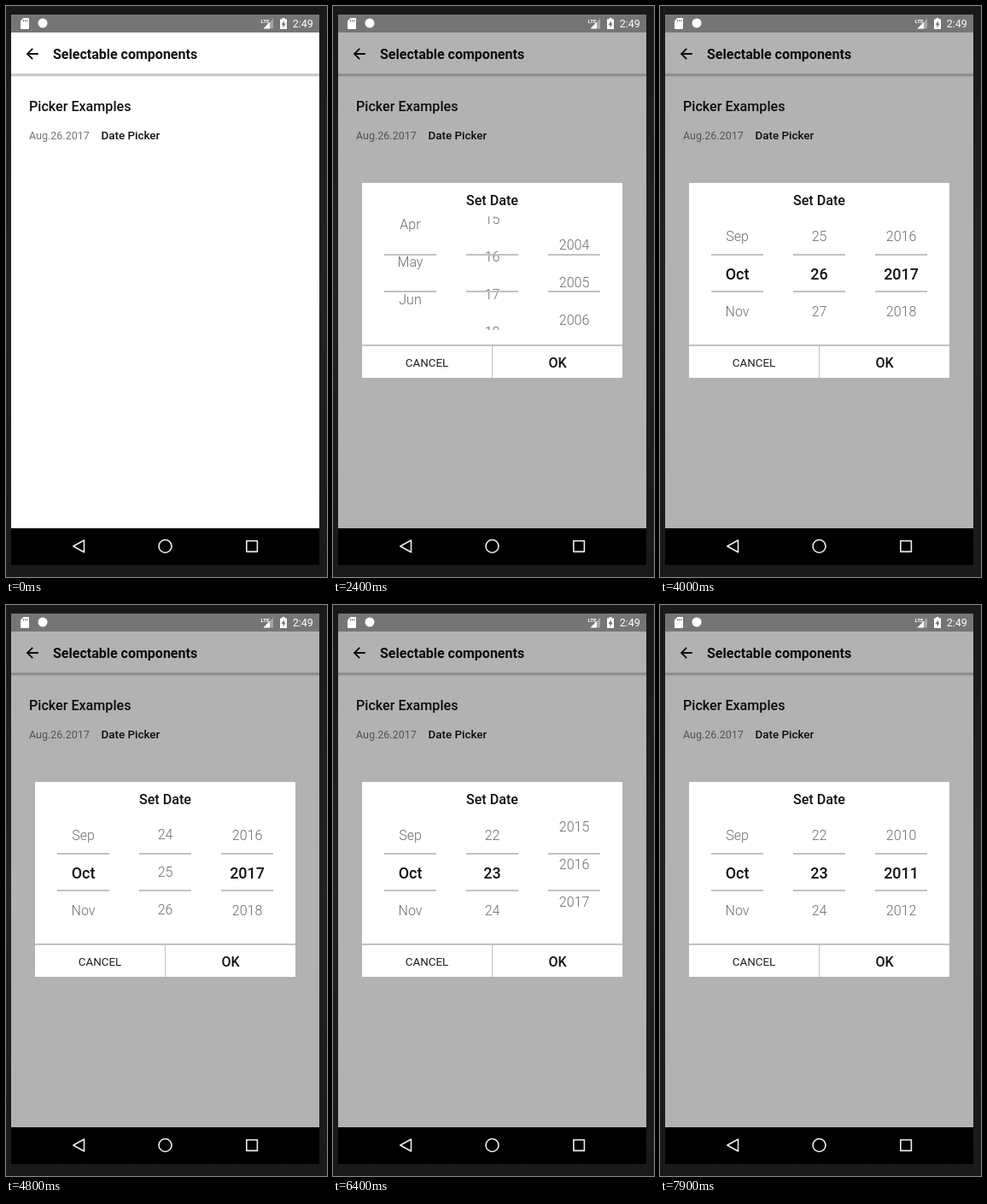
These frames come from a looping animation (376 px wide and 668 px high, 8 s). An HTML page:

```html
<!DOCTYPE html>
<html lang="en">
<head>
<meta charset="utf-8">
<title>Date picker</title>
<style>
  html, body { margin: 0; width: 100%; height: 100%; overflow: hidden; background: #1b1b1b; }
  svg { display: block; width: 376px; height: 668px; font-family: Roboto, sans-serif; }
  .medium { font-weight: 500; }
  .bold { font-weight: 700; }
  .middle, .wheel { text-anchor: middle; }
  .wheel text { font-size: 16px; font-weight: 300; fill: #6c6c6c; }
  .wheel text.selected { font-size: 17.9px; font-weight: 500; fill: #111; }
  .line { fill: none; stroke: #c2c2c2; stroke-width: 2; }
</style>
</head>
<body>
<svg viewBox="0 0 376 668">
  <defs>
    <linearGradient id="frame" x2="0" y2="1">
      <stop offset="0" stop-color="#191919"/>
      <stop offset=".5" stop-color="#222"/>
      <stop offset="1" stop-color="#191919"/>
    </linearGradient>
    <linearGradient id="shadow" x2="0" y2="1">
      <stop offset="0" stop-color="#000" stop-opacity=".34"/>
      <stop offset="1" stop-color="#000" stop-opacity="0"/>
    </linearGradient>
    <clipPath id="wheelArea"><rect x="34" y="246" width="305" height="133"/></clipPath>
  </defs>

  <rect width="376" height="668" fill="url(#frame)"/>
  <rect x="6" y="10" width="361" height="644"/>

  <!-- status bar -->
  <rect x="6" y="10" width="361" height="21" fill="#757575"/>
  <g fill="#fff">
    <path d="M20.500 14H26q1 0 1 1V26q0 1-1 1H18q-1 0-1-1V17.500Z"/>
    <path d="M20.500 16v2.500M22.700 16v2.500M24.900 16v2.500" stroke="#757575"/>
    <circle cx="43" cy="20" r="5.500"/>
    <text x="298.500" y="19.500" font-size="6.200" class="bold">LTE</text>
    <path d="M313 14.500V26.500H301.500Z" opacity=".35"/>
    <path d="M309 18.700V26.500H301.500Z"/>
    <path d="M323.500 14h3v1.500H329V27h-8V15.500h2.500Z"/>
    <path d="M326 17l-3.500 5h2v3.500l3.200-5h-2Z" fill="#757575"/>
    <text x="335.800" y="25" font-size="12.500">2:49</text>
  </g>

  <!-- page -->
  <rect x="6" y="31" width="361" height="580" fill="#fff"/>
  <rect x="6" y="79.500" width="361" height="4" fill="url(#shadow)"/>
  <path d="M37.800 56H25.500M31.200 49.800 25 56l6.200 6.200" fill="none" stroke="#111" stroke-width="1.800"/>
  <g fill="#111">
    <text x="55" y="62" font-size="16" class="bold">Selectable components</text>
    <text x="27" y="123" font-size="16.100" class="medium">Picker Examples</text>
    <text x="111.500" y="156" font-size="13.400" class="medium">Date Picker</text>
  </g>
  <text x="27" y="156" font-size="12.500" fill="#757575">Aug.26.2017</text>
  <rect id="pressed" x="27" y="142" width="71" height="17.500"/>

  <!-- dialog -->
  <g id="dialog">
    <rect x="6" y="31" width="361" height="580" opacity=".3"/>
    <rect x="34" y="207" width="305" height="228" fill="#fff"/>
    <text x="186.500" y="233" font-size="16.100" fill="#111" class="medium middle">Set Date</text>
    <g id="wheels" clip-path="url(#wheelArea)"></g>
    <path class="line" d="M60 291h61m35 0h61m35 0h61M60 334h61m35 0h61m35 0h61"/>
    <path class="line" d="M34 397H339"/>
    <path class="line" d="M186.500 397V435" style="stroke-width:1"/>
    <text x="110" y="422" font-size="13.400" fill="#222" class="middle">CANCEL</text>
    <text x="263" y="423" font-size="16" fill="#111" class="medium middle">OK</text>
  </g>

  <!-- navigation bar -->
  <g fill="none" stroke="#eee" stroke-width="1.600" stroke-linejoin="round">
    <path d="M91.500 625V639L78.800 632Z"/>
    <circle cx="186.500" cy="632" r="7.500"/>
    <rect x="281.800" y="625.800" width="12.600" height="12.600"/>
  </g>
</svg>
<script>
const LOOP = 8000, STEP = 100, PRESS = 1700, OPEN = 2400, SETTLED = 3100;
const ROW = 44, CENTER = 313.3;
const MONTHS = 'Jan Feb Mar Apr May Jun Jul Aug Sep Oct Nov Dec'.split(' ');

const linear = u => u;
const smooth = u => (1 - Math.cos(Math.PI * u)) / 2;
const speedUp = u => u ** 1.2;
const slowDown = u => 1 - (1 - u) ** 2;

// Each move: [start, end, destination, easing]
const wheels = [
  { x: 90.5, first: 1, opened: 8, label: n => MONTHS[(n + 11) % 12],
    moves: [[3300, 4000, 10, smooth]] },
  { x: 186.5, first: 1, opened: 26, label: String,
    moves: [[4500, 5300, 22.82, smooth], [5300, 5400, 22.81, linear], [5400, 5700, 23, smooth]] },
  { x: 282.5, first: 1985, opened: 2017, label: String,
    moves: [[6200, 7100, 2012.34, speedUp], [7100, 7500, 2011.38, slowDown], [7600, 7900, 2011, smooth]] }
];

const svgNode = (tag, attributes, parent) => {
  const node = document.createElementNS('http://www.w3.org/2000/svg', tag);
  for (const name in attributes) node.setAttribute(name, attributes[name]);
  return parent.appendChild(node);
};
const byId = id => document.getElementById(id);

for (const wheel of wheels) {
  const group = svgNode('g', { class: 'wheel' }, byId('wheels'));
  wheel.rows = [-2, -1, 0, 1, 2].map(() => svgNode('text', { x: wheel.x }, group));
}

function wheelValue({ first, opened, moves }, t) {
  if (t < SETTLED) {
    // tail of a viscous scroll, already under way when the dialog appears
    const remaining = 0.632 * Math.exp(1 - 1.504 - 0.0108 * (t - OPEN));
    return opened - remaining * (opened - first);
  }
  let value = opened;
  for (const [start, end, to, ease] of moves) {
    if (t <= start) break;
    value += (to - value) * ease(Math.min(1, (t - start) / (end - start)));
  }
  return value;
}

function drawWheel(wheel, t) {
  const value = wheelValue(wheel, t), nearest = Math.round(value);
  const moving = t < SETTLED || (t > wheel.moves[0][0] && t < wheel.moves.at(-1)[1]);
  wheel.rows.forEach((row, i) => {
    const item = nearest + i - 2, selected = !moving && i === 2;
    row.textContent = wheel.label(item);
    row.setAttribute('class', selected ? 'selected' : '');
    row.setAttribute('y', CENTER + (item - value) * ROW + (selected ? 6.5 : 5.7));
  });
}

function draw(now) {
  const t = Math.floor((now % LOOP) / STEP) * STEP;
  byId('pressed').style.display = t >= PRESS && t < OPEN ? '' : 'none';
  byId('dialog').style.display = t >= OPEN ? '' : 'none';
  if (t >= OPEN) wheels.forEach(wheel => drawWheel(wheel, t));
}

const began = performance.now();
function tick() {
  draw(performance.now() - began);
  requestAnimationFrame(tick);
}
tick();
</script>
</body>
</html>
```
